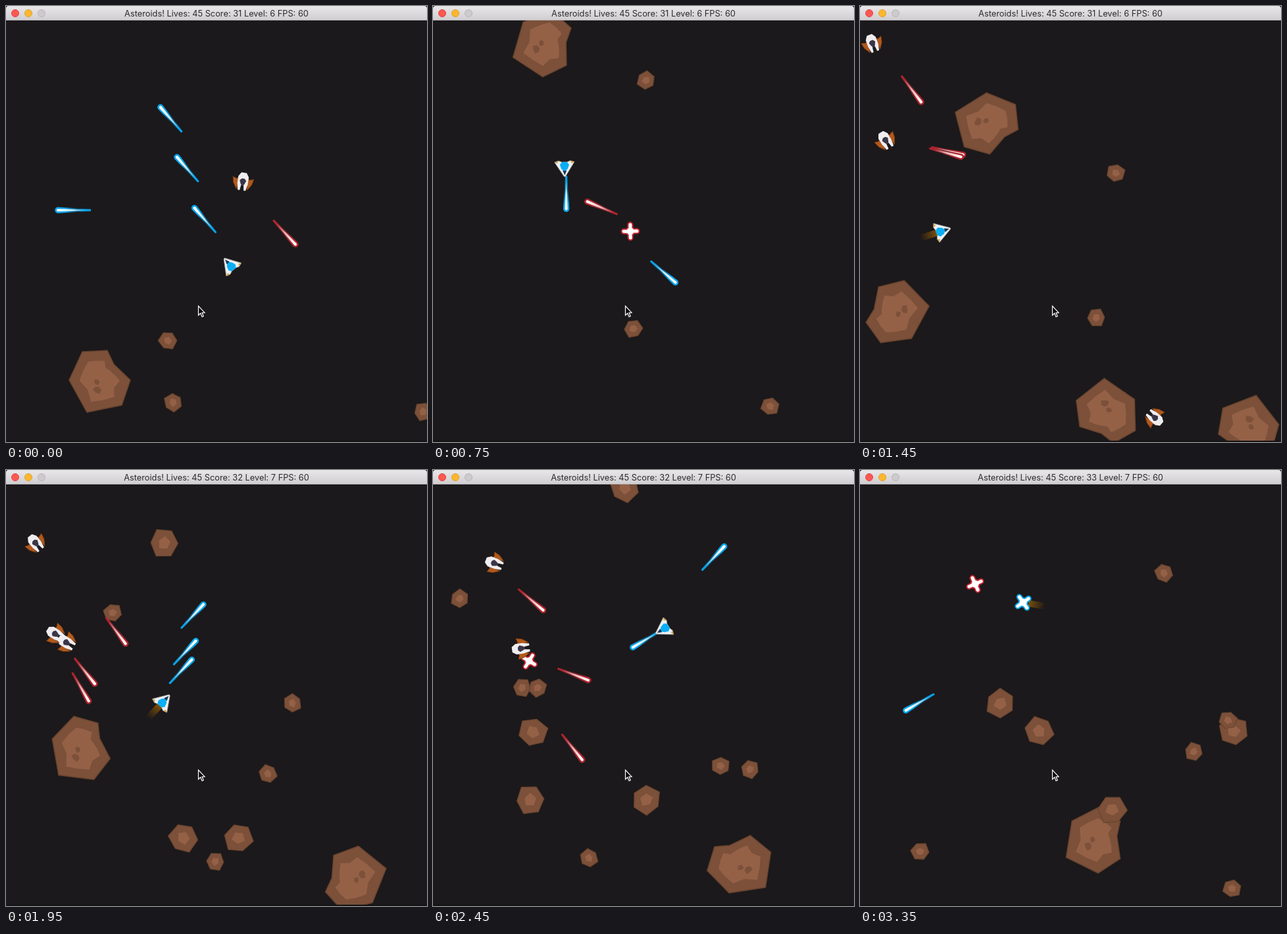
An HTML page with a canvas for the animation above (3400 ms loop, 640 by 662 pixels).

```html
<!DOCTYPE html>
<html lang="en">
<head>
<meta charset="utf-8">
<title>Asteroids!</title>
<style>
  html, body { margin: 0; width: 640px; height: 662px; overflow: hidden; background: #1b191b; }
  canvas { position: absolute; left: 0; top: 0; display: block; }
  header {
    position: absolute; left: 0; top: 0; width: 640px; height: 22px; box-sizing: border-box;
    background: linear-gradient(#e9e7e9, #d0ced0); border-bottom: 1px solid #aeacae;
    border-radius: 4px 4px 0 0; text-align: center;
    font: 12.8px/23px Inter, Roboto, sans-serif; color: #2d2b2d; white-space: pre;
  }
  i { position: absolute; top: 5px; width: 12px; height: 12px; border-radius: 50%; box-sizing: border-box; }
  .close { left: 8px; background: #fc5753; border: 1px solid #df4744; }
  .min { left: 28px; background: #fdb72c; border: 1px solid #de9f34; }
  .zoom { left: 48px; background: #cccacc; border: 1px solid #b9b7b9; }
</style>
</head>
<body>
<canvas id="stage" width="640" height="662"></canvas>
<header><i class="close"></i><i class="min"></i><i class="zoom"></i><span id="caption"></span></header>
<script>
const LOOP = 3400, STEP = 50, TOP = 22, SIZE = 640, TAU = 2 * Math.PI, RAD = Math.PI / 180;
const g = document.getElementById('stage').getContext('2d');
const caption = document.getElementById('caption');

// Motion helpers
const wrap = v => ((v % SIZE) + SIZE) % SIZE;
const along = (p, deg, d) => ({ x: p.x + d * Math.cos(deg * RAD), y: p.y + d * Math.sin(deg * RAD) });

function segment(keys, t) {
  let i = 0;
  while (i < keys.length - 2 && t >= keys[i + 1][0]) i++;
  const a = keys[i], b = keys[i + 1];
  return [a, b, (t - a[0]) / (b[0] - a[0])];
}

function lerp(keys, t) {
  const [a, b, u] = segment(keys, t);
  return a.slice(1).map((v, i) => v + (b[i + 1] - v) * u);
}

// Rocks drift in straight lines; a split rock leaves its parts where it was.
const rocks = [];
function addRock(kind, born, x, y, vx, vy, more = {}) {
  const n = rocks.length;
  const { split = LOOP, parts = [], turn = n * 25, spin = n % 2 ? 95 : -85 } = more;
  rocks.push({ kind, born, split, x, y, vx, vy, turn, spin });
  const s = (split - born) / 1000;
  for (const [part, pvx, pvy, rest] of parts) addRock(part, split, x + vx * s, y + vy * s, pvx, pvy, rest);
}
addRock('small', 0, 246, 508, 78, -24);
addRock('small', 0, 254, 602, 93, 201);
addRock('small', 0, 634, 616, -162, -11);
addRock('big', 0, 142, -70, 35, 171, {
  turn: 0, spin: 60, split: 1500, parts: [
    ['medium', 102, -168],
    ['medium', 65, 155, { split: 1750, parts: [['small', -243, -43]] }]
  ]
});
addRock('big', 1000, 3, 501, 116, -80, {
  turn: 110, spin: 283, split: 2050, parts: [
    ['medium', 68, -48],
    ['medium', 65, -255, {
      split: 2400, parts: [['small', -240, 55], ['small', 230, 60, { split: 2650 }]]
    }]
  ]
});
addRock('big', 1000, 337, 661, 85, -100, {
  turn: 122, spin: 70, split: 1500, parts: [['medium', -244, -116], ['medium', -58, -116]]
});
addRock('big', 1100, 634, 655, -123, -41, { turn: 129, spin: 119.5 });
rocks.sort((a, b) => a.born - b.born);

// Player: keys of [t, x, y, vx, vy] and [t, heading]
const flight = [
  [-600, 416, 310, -90, 80], [0, 341, 394, -90, 150], [550, 256, 322, -270, -360],
  [750, 200, 245, -260, -330], [1450, 124, 342, 180, 20], [1950, 239, 352, 230, -10],
  [2450, 351, 241, 110, -200], [2850, 349, 192, -110, -50], [3350, 248, 201, -250, 60]
];
const turns = [[-600, -180], [-400, -131], [100, -131], [550, 41], [740, 90], [1450, -18],
  [1600, -47], [2050, -47], [2400, -211], [2850, -210], [3350, -170]];
const thrust = [[100, 450], [900, 2100], [2650, LOOP]];

function shipAt(t) {
  const [a, b, u] = segment(flight, t), d = (b[0] - a[0]) / 1000, w = 1 - u;
  const axis = i => w * w * (1 + 2 * u) * a[i] + u * u * (3 - 2 * u) * b[i]
    + d * u * w * (w * a[i + 2] - u * b[i + 2]);
  return { x: axis(1), y: axis(2), heading: lerp(turns, t)[0] };
}

// Enemies: keys of [t, x, y]; each ends in a short burst.
const enemies = [
  { born: 0, gone: 800, path: [[-500, 320, 231], [0, 360, 267], [600, 303, 326], [750, 300, 342]] },
  { born: 1000, gone: LOOP, path: [[1000, 2, 24], [1450, 19, 57], [1950, 45, 111], [2850, 132, 166], [3350, 175, 173]] },
  { born: 1000, gone: 2500, path: [[1000, 12, 190], [1450, 39, 204], [1950, 92, 262], [2450, 146, 290]] },
  { born: 1000, gone: 3100, path: [[1000, 12, 190], [1450, 39, 204], [1950, 75, 249], [2450, 134, 271], [2850, 181, 266]] },
  { born: 1000, gone: 1700, path: [[1000, 470, 660], [1450, 448, 625]] }
];
const enemyAt = (e, t) => {
  const [x, y] = lerp(e.path, t);
  return { x, y };
};

// Shots fly straight from the shooter's nose until they expire or hit.
const BLUE = { rim: '#08a4ea', mid: '#0a4a69', glow: '#c4ecff', speed: 470, life: 650, nose: 55 };
const RED = { rim: '#ae242e', mid: '#64202a', glow: '#efb4b4', speed: 295, life: 1000, nose: 30 };
const shots = [];
const fire = (look, t, from, deg, hit = t + look.life) => shots.push({ look, t, from, deg, hit });

for (const t of [-600, -390, -240, -90, 550, 740, 1650, 1800, 1880, 2450, 2500, 2640, 2760]) {
  const ship = shipAt(t);
  fire(BLUE, t, ship, ship.heading, t === 2450 ? 2650 : undefined);
}
for (const [t, who, deg, hit] of [
  [-500, 0, 47.5], [600, 0, 203, 1100], [1050, 1, 53], [1060, 2, 13.5, 1500], [1070, 3, 15, 1500],
  [1500, 2, 60, 2050], [1580, 3, 51.5], [2050, 1, 40.3], [2080, 2, 21]
]) fire(RED, t, enemyAt(enemies[who], t), deg, hit);

// Drawing helpers
function at(p, deg, draw) {
  g.save();
  g.translate(p.x, p.y);
  g.rotate(deg * RAD);
  draw();
  g.restore();
}

function poly(points, fill, stroke, width = 1) {
  g.beginPath();
  for (const [x, y] of points) g.lineTo(x, y);
  g.closePath();
  g.fillStyle = fill;
  g.fill();
  if (stroke) { g.strokeStyle = stroke; g.lineWidth = width; g.stroke(); }
}

const mirror = half => half.concat(half.map(([x, y]) => [x, -y]).reverse());
const scaled = (points, k) => points.map(([x, y]) => [x * k, y * k]);
const ring = (n, r, bump) => Array.from({ length: n }, (_, i) => {
  const a = TAU * i / n, d = r * (1 + bump * Math.sin(i * 2.4));
  return [d * Math.cos(a), d * Math.sin(a)];
});

const EDGE = '#68432f', ROCK = '#7c5039', LIGHT = '#946147';
const bigShape = [[-26, -45], [12, -47], [22, -26], [47, -2], [34, 36], [-19, 47], [-46, -2]];
// Ragged inner plateau: corners of the outline with dented middles between them
const plateau = scaled(bigShape, 0.66).flatMap(([x, y], i, all) => {
  const [nx, ny] = all[(i + 1) % all.length], dent = i % 2 ? 0.84 : 1.04;
  return [[x, y], [(x + nx) / 2 * dent, (y + ny) / 2 * dent]];
});

function drawRock(r, t) {
  if (t < r.born || t >= r.split) return;
  const s = (t - r.born) / 1000;
  const p = { x: wrap(r.x + r.vx * s), y: TOP + wrap(r.y - TOP + r.vy * s) };
  at(p, r.turn + r.spin * s, () => {
    if (r.kind === 'big') {
      poly(bigShape, ROCK, EDGE, 1.5);
      poly(plateau, LIGHT);
      g.translate(-4, 1);
      poly(ring(5, 4.5, 0.2), ROCK);
      g.translate(1, 12);
      poly(ring(6, 6, 0.25), ROCK);
    } else {
      const size = r.kind === 'medium' ? 22 : 13.8;
      poly(ring(6, size, 0.08), ROCK, EDGE, 1.2);
      poly(ring(5, size * 0.45, 0.12), LIGHT);
    }
  });
}

function fade(...stops) {
  const paint = g.createLinearGradient(0, 0, -50, 0);
  for (const [u, color] of stops) paint.addColorStop(u, color);
  return paint;
}

function dart(r, tail, length, paint) {
  g.fillStyle = paint;
  g.beginPath();
  g.arc(0, 0, r, -TAU / 4, TAU / 4);
  g.lineTo(-length, tail);
  g.lineTo(-length, -tail);
  g.fill();
}

function drawShot({ look, t: t0, from, deg, hit }, t) {
  if (t < t0 || t >= hit) return;
  const { rim, mid, glow, speed, nose } = look;
  at(along(from, deg, nose + speed * (t - t0) / 1000), deg, () => {
    dart(4.7, 1.4, 50, fade([0, rim], [0.2, rim], [0.6, mid], [0.95, rim]));
    dart(2.1, 0.7, 48, fade([0, '#fff'], [0.45, glow], [0.85, rim]));
  });
}

function drawBurst(color) {
  g.lineCap = 'round';
  for (const [c, w, r] of [[color, 9, 7.5], ['#fff', 5, 5.5]]) {
    g.strokeStyle = g.fillStyle = c;
    g.lineWidth = w;
    g.beginPath();
    g.moveTo(-10, 0); g.lineTo(10, 0);
    g.moveTo(0, -10); g.lineTo(0, 10);
    g.stroke();
    g.beginPath();
    g.arc(0, 0, r, 0, TAU);
    g.fill();
  }
}

function enemyShip() {
  const wing = [[-6, 6], [-4, 10], [-6, 16], [3, 14], [12, 8]];
  for (const s of [-1, 1]) poly(wing.map(([x, y]) => [x, y * s]), '#b2591c', '#7d3c12', 0.8);
  poly(mirror([[-14, 4], [-8, 8], [3, 8], [13, 6], [13, 3], [5, 2]]), '#efedf0');
  poly(mirror([[-5, 2], [-2, 5], [3, 3], [6, 1]]), '#3b3548');
}

function drawEnemy(e, ship, t) {
  if (t < e.born || t >= e.gone) return;
  const p = enemyAt(e, t), face = Math.atan2(ship.y - p.y, ship.x - p.x) / RAD;
  if (t >= e.gone - 100) at(p, face + 45, () => drawBurst('#c4202c'));
  else at(p, face, enemyShip);
}

function flame() {
  for (let i = 0; i < 9; i++) {
    g.fillStyle = `rgba(146, 92, 8, ${0.85 - i * 0.095})`;
    g.fillRect(-11 - i * 2.7, -5, 2.4, 10);
  }
}

function playerShip() {
  poly(mirror([[14, 1], [-8, 15], [-10, 9], [-8, 4]]), '#eef0f2', '#a3a3a0', 0.8);
  for (const s of [-1, 1]) poly([[-8, 15 * s], [-10, 9 * s], [-6, 11 * s]], '#d9a441');
  poly(mirror([[-8, 4], [-4, 7], [2, 5], [6, 1]]), '#0aaef5');
  poly(mirror([[12, 0], [5, 3]]), '#1d3a58');
}

function drawPlayer(ship, t) {
  at(ship, ship.heading, () => {
    if (thrust.some(([a, b]) => t >= a && t < b)) flame();
    if (t < LOOP - STEP) playerShip();
    else at({ x: 0, y: 0 }, 45, () => drawBurst('#08a4ea'));
  });
}

function drawPointer() {
  at({ x: 292, y: 455 }, 0, () => poly(
    [[0.5, 0.5], [0.5, 14.5], [3.7, 11.5], [6, 17], [8.2, 16], [6, 10.8], [10, 10.6]], '#0c0b0c', '#fff', 1.2));
}

function render(t) {
  g.fillStyle = '#1b191b';
  g.fillRect(0, 0, 640, 662);
  const ship = shipAt(t);
  rocks.forEach(r => drawRock(r, t));
  enemies.forEach(e => drawEnemy(e, ship, t));
  shots.forEach(s => drawShot(s, t));
  drawPlayer(ship, t);
  g.fillStyle = '#151315';
  g.fillRect(0, 660, 640, 2);
  drawPointer();

  // The title refreshes once a second.
  const tick = Math.floor((t + 500) / 1000);
  const text = `Asteroids! Lives: 45 Score: ${Math.max(31, 30 + tick)} Level: ${tick < 2 ? 6 : 7} FPS: 60`;
  if (caption.textContent !== text) caption.textContent = text;
}

const start = performance.now();
function loop() {
  const t = (performance.now() - start) % LOOP;
  render(Math.floor(t / STEP) * STEP);
  requestAnimationFrame(loop);
}
loop();
</script>
</body>
</html>
```
